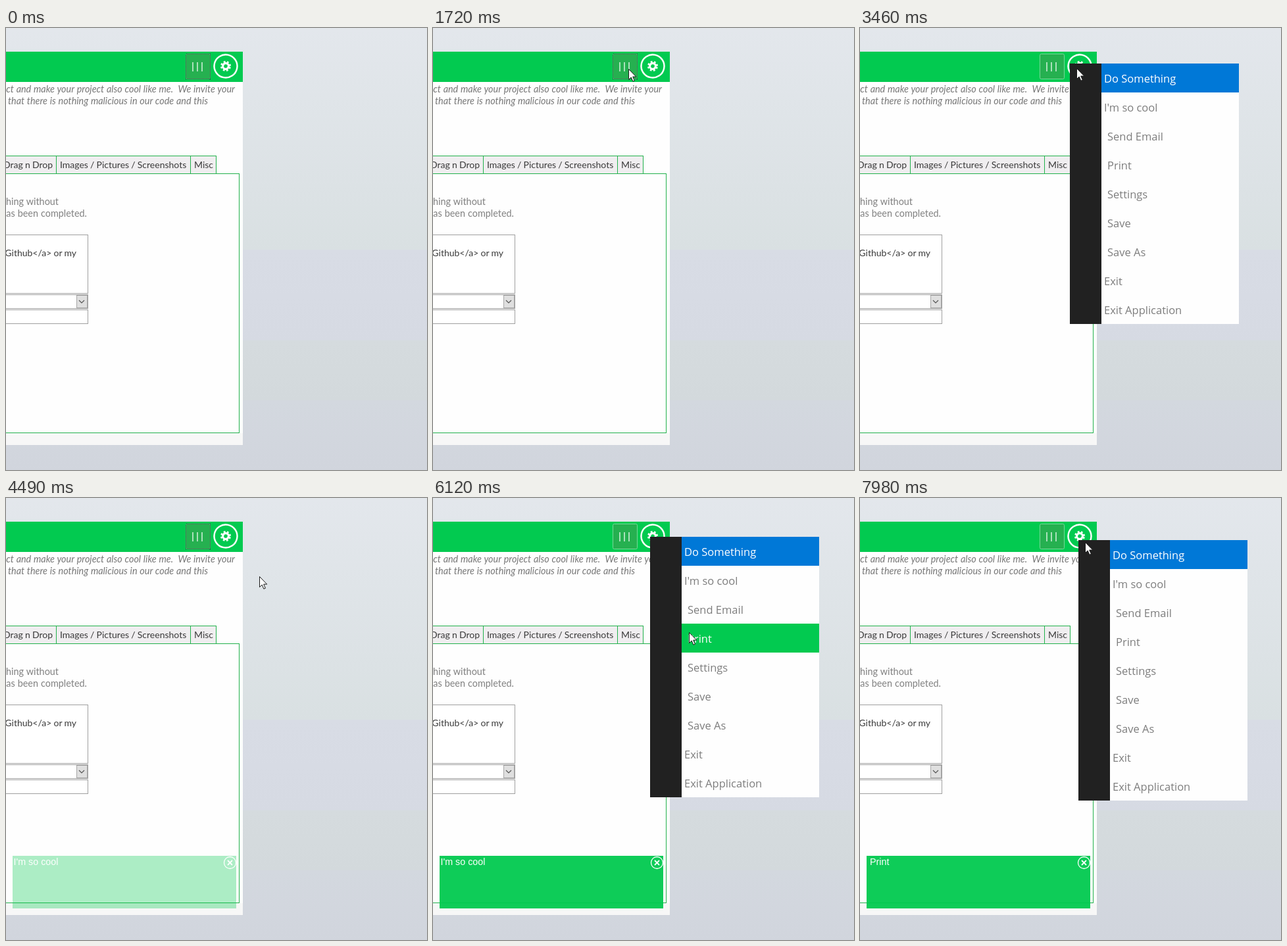
An HTML page for the animation above (8 s loop, 640 by 672 pixels).

```html
<!DOCTYPE html>
<html lang="en">
<head>
<meta charset="utf-8">
<title>Context menus and toasts</title>
<style>
  html, body { margin: 0; width: 100%; height: 100%; overflow: hidden; }
  svg { display: block; width: 640px; height: 672px; overflow: hidden; }
  text { white-space: pre; }
  .page { font: 14px Lato, sans-serif; word-spacing: -.4px; fill: #3a3a3a; }
  .soft, .intro { font-size: 14.4px; word-spacing: .4px; fill: #808080; }
  .intro { font-style: italic; fill: #787878; }
  .end { text-anchor: end; }
  .field { fill: #fff; stroke: #a0a0a0; }
  .tab { fill: #f0eef0; stroke: #22b14c; }
  .menu { font: 16.5px "Open Sans", "Noto Sans", sans-serif; }
  .menu text { fill: #7d7d7d; }
  .menu .first rect { fill: #0078d7; }
  .menu .hover rect { fill: #02ca50; }
  .menu .first text, .menu .hover text { fill: #fff; }
  .toast { font: 14.3px "Liberation Sans", Arial, sans-serif; fill: #fff; }
</style>
</head>
<body>
<svg viewBox="0 0 640 672" xmlns="http://www.w3.org/2000/svg">
  <defs>
    <linearGradient id="sky" x2="0" y2="1">
      <stop offset="0" stop-color="#e3e7ec"/>
      <stop offset=".36" stop-color="#dce2e5"/>
      <stop offset=".502" stop-color="#d9e0e2"/>
      <stop offset=".502" stop-color="#d8dce5"/>
      <stop offset=".707" stop-color="#d6dae3"/>
      <stop offset=".707" stop-color="#d5dbde"/>
      <stop offset=".843" stop-color="#d3d9dc"/>
      <stop offset=".843" stop-color="#d3d8df"/>
      <stop offset="1" stop-color="#d1d5dd"/>
    </linearGradient>
  </defs>
  <rect width="640" height="672" fill="url(#sky)"/>

  <rect y="36" width="360" height="598" fill="#fefefe"/>
  <rect y="616" width="360" height="18" fill="#f7f7f7"/>
  <rect y="36" width="360" height="46" fill="#02ca50"/>

  <rect x="273.5" y="39.5" width="37" height="38" rx="2" fill="#26b050" stroke="#76d898"/>
  <rect id="focus" x="273.5" y="39.5" width="37" height="38" fill="none" stroke="#222"
    stroke-dasharray="1 1" shape-rendering="crispEdges"/>
  <path d="M284 52v14M291 52v14M298 52v14" stroke="#b9e6c6" stroke-width="1.8"/>

  <g transform="translate(334 58) rotate(11.25)" fill="none" stroke="#fff">
    <circle r="17.5" stroke-width="2.4"/>
    <circle r="6.5" stroke-width="3" stroke-dasharray="2.55"/>
    <circle r="4.4" stroke-width="3.2"/>
  </g>

  <g class="page">
    <text class="intro end" x="348" y="98">Clone this project and make your project also cool like me.  We invite your</text>
    <text class="intro end" x="307" y="116">to see that there is nothing malicious in our code and this</text>

    <rect class="tab" x="-20" y="194.5" width="96.5" height="27"/>
    <rect class="tab" x="76.5" y="194.5" width="204" height="27"/>
    <rect class="tab" x="280.5" y="194.5" width="39" height="27"/>
    <text class="end" x="71" y="213">Drag n Drop</text>
    <text x="82" y="213">Images / Pictures / Screenshots</text>
    <text x="286" y="213">Misc</text>
    <rect x="-20" y="221.5" width="374.5" height="394" fill="none" stroke="#22b14c"/>

    <text class="soft end" x="80" y="269">anything without</text>
    <text class="soft end" x="123" y="287">has been completed.</text>

    <rect class="field" x="-20" y="314.5" width="144.5" height="89"/>
    <rect class="field" x="-20" y="405.5" width="144.5" height="21"/>
    <rect class="field" x="-20" y="428.5" width="144.5" height="21"/>
    <text class="end" x="107" y="347">Github&lt;/a&gt; or my</text>
    <rect x="107.5" y="406.5" width="16" height="19" fill="#dfdfdf" stroke="#a8a8a8"/>
    <path d="M111 414l4 4 4-4" fill="none" stroke="#555" stroke-width="1.2"/>
  </g>

  <g id="toasts"></g>
  <g id="menus"></g>
  <path id="cursor" d="M.5.5v16l3.7-3.5 2.7 6.2 2.5-1.1-2.7-6h5z" fill="#fff" stroke="#1a1a1a"/>
</svg>
<script>
const LOOP = 8000, ROW = 44, STRIP = 48, WIDTH = 257;
const $ = id => document.getElementById(id);
const clamp = v => Math.max(0, Math.min(1, v));
const ease = k => k * k * (3 - 2 * k);

// Pointer moves: start, end, x, y reached
const moves = [
  [0, 740, 345, 37],
  [740, 1200, 285, 60],
  [1200, 1700, 297, 62],
  [1860, 2660, 230, 106],
  [2660, 3390, 329, 61],
  [3460, 4190, 385, 119],
  [4700, 5290, 340, 62],
  [5450, 6150, 389, 205],
  [6180, 6950, 396, 223],
  [7310, 7740, 342, 67]
];

const gearItems = ["Do Something", "I'm so cool", " Send Email", " Print", " Settings",
  " Save", " Save As", "Exit", "Exit Application"];
const barItems = ["Do Something", "I'm so cool", " Settings", "Exit"];

const menus = [
  { from: 1790, to: 2730, x: 288, y: 61, items: barItems },
  { from: 3455, to: 4265, x: 319, y: 54, items: gearItems },
  { from: 5450, to: 6175, x: 330, y: 59, items: gearItems },
  { from: 6175, to: 6880, x: 332, y: 63, items: gearItems },
  { from: 7895, to: LOOP, x: 332, y: 64, items: gearItems }
];

const toasts = [
  { label: "I'm so cool", from: 4485, gone: 7700, lift: 7095 },
  { label: " Print", from: 7095, gone: Infinity, lift: Infinity }
];

function menuRow(label, i) {
  const x = STRIP + (label[0] === " " ? 9 : 4);
  return `<g class="${i ? "" : "first"}">
    <rect x="${STRIP}" y="${i * ROW}" width="${WIDTH - STRIP}" height="${ROW}" fill="#fefefe"/>
    <text x="${x}" y="${i * ROW + 29}">${label.trim()}</text></g>`;
}

$("menus").innerHTML = menus.map(m =>
  `<g class="menu" transform="translate(${m.x} ${m.y})">
    <rect width="${STRIP}" height="${m.items.length * ROW}" fill="#212121"/>
    ${m.items.map(menuRow).join("")}</g>`).join("");

$("toasts").innerHTML = toasts.map(n =>
  `<g class="toast"><rect width="340" height="80" fill="#02ca50"/>
    <text x="${n.label[0] === " " ? 5 : 1.5}" y="14">${n.label.trim()}</text>
    <g transform="translate(330.5 10.5)" fill="none" stroke="#fff">
      <circle r="9" stroke-width="1.3"/>
      <path d="M-3.5-3.5l7 7m0-7l-7 7" stroke-width="1.8"/>
    </g></g>`).join("");

menus.forEach((m, i) => {
  m.el = $("menus").children[i];
  m.rows = [...m.el.querySelectorAll("g")];
});
toasts.forEach((n, i) => n.el = $("toasts").children[i]);

function pointer(t) {
  let x = 77, y = 690;
  for (const [start, end, toX, toY] of moves) {
    const k = ease(clamp((t - start) / (end - start)));
    x += (toX - x) * k;
    y += (toY - y) * k;
  }
  return [Math.round(x), Math.round(y)];
}

function draw(t) {
  const [px, py] = pointer(t);
  $("cursor").setAttribute("transform", `translate(${px} ${py})`);

  let open = false;
  for (const m of menus) {
    const on = t >= m.from && t < m.to;
    open ||= on;
    m.el.style.display = on ? "" : "none";
    const inside = px >= m.x + STRIP && px < m.x + WIDTH;
    const row = Math.floor((py - m.y) / ROW);
    m.rows.forEach((g, i) => g.classList.toggle("hover", inside && i === row));
  }
  $("focus").style.display = open ? "none" : "";

  for (const n of toasts) {
    const shown = t < n.from ? 0 : clamp((t - n.from + 65) / 210);
    n.el.style.opacity = .95 * Math.min(shown, clamp((n.gone - t) / 1000));
    n.el.setAttribute("transform", `translate(10 ${t < n.lift ? 544 : 464})`);
  }
}

function tick() {
  draw(performance.now() % LOOP);
  requestAnimationFrame(tick);
}
tick();
</script>
</body>
</html>
```
